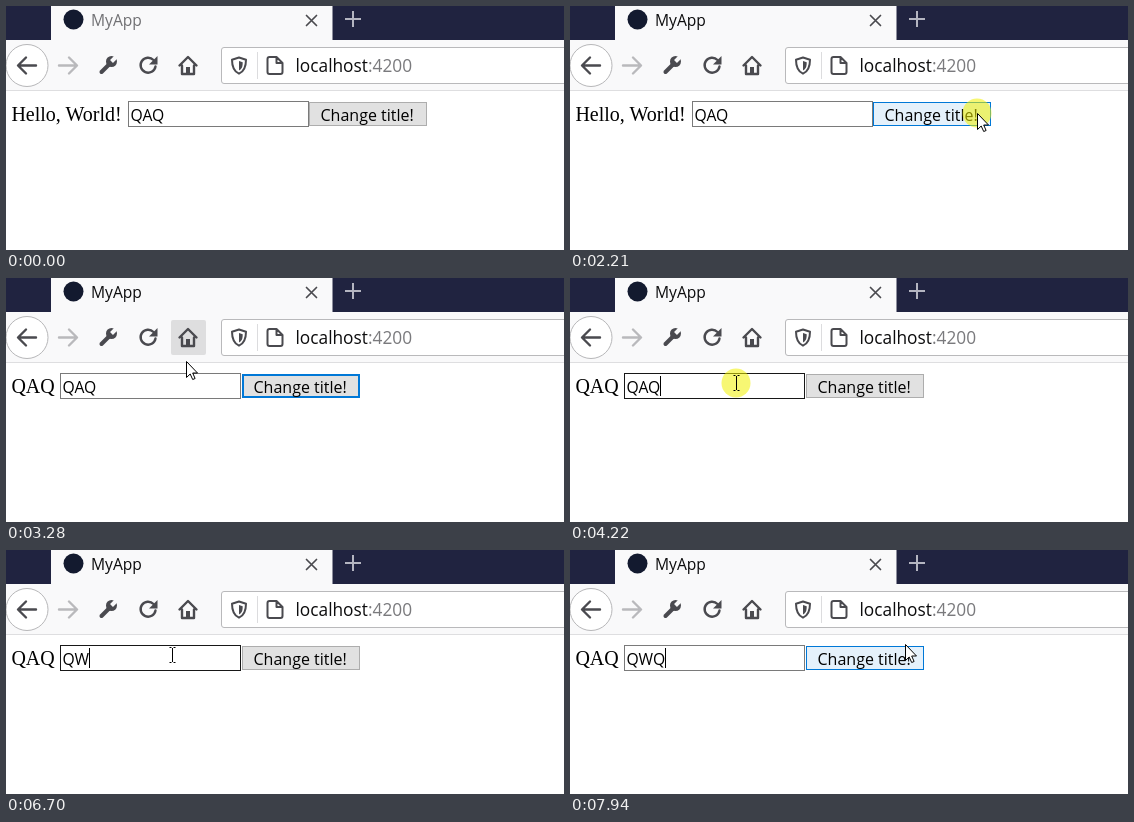
An HTML page for the animation above (8000 ms loop, 558 px wide and 244 px high).

```html
<!DOCTYPE html>
<html lang="en">
<head>
<meta charset="utf-8">
<title>MyApp</title>
<style>
  html, body { margin: 0; width: 100%; height: 100%; overflow: hidden; background: #fff; }
  svg { display: block; width: 558px; height: 244px; }
  text { white-space: pre; }
  .ui { font-family: "Open Sans", "Noto Sans", sans-serif; }
  .page { font: 20px "Liberation Serif", serif; }
  .icon { fill: none; stroke: #4a4a4f; stroke-width: 2.4; stroke-linecap: round; stroke-linejoin: round; }
  .thin { stroke-width: 2; }
  .off { stroke: #b9b9bc; }
</style>
</head>
<body>
<svg viewBox="0 0 558 244">
  <rect width="558" height="34" fill="#202340"/>
  <rect x="45" width="281.5" height="34" fill="#f9f9fa"/>
  <rect y="34" width="558" height="50" fill="#f9f9fa"/>
  <rect y="84" width="558" height="1" fill="#dedee0"/>

  <circle cx="67.5" cy="13.5" r="10" fill="#131a2f"/>
  <text id="tabTitle" class="ui" x="85" y="19.5" font-size="15.6">MyApp</text>
  <path class="icon" style="stroke-width:1.7" d="M300.5 9.5l10 10m0-10l-10 10"/>
  <path d="M339 13h16M347 5v16" stroke="#b4b5c1" stroke-width="2"/>

  <circle cx="21" cy="59.5" r="21" fill="#fff" stroke="#b7b7b9"/>
  <path class="icon" d="M30 59.5H12.5m7.5-8l-8 8 8 8"/>
  <path class="icon off" d="M53 59.5h17.5m-7.5-8l8 8-8 8"/>

  <path class="icon" style="stroke-width:4" d="M95.500 66l7-7"/>
  <circle cx="105.5" cy="55.5" r="5.5" fill="#4a4a4f"/>
  <path d="M105.5 55.5l6-6" stroke="#f9f9fa" stroke-width="4"/>

  <path class="icon" d="M147.5 54a7.5 7.5 0 1 0 2 6.500"/>
  <path d="M151.500 50v8.500h-8.500z" fill="#4a4a4f"/>

  <rect id="homeHover" x="165" y="42" width="35" height="35" rx="2" fill="#dededf"/>
  <path class="icon" d="M173.5 59.5l8.5-8.5 8.5 8.5M176 59.5v8.5h12v-8.5"/>
  <rect x="180" y="61" width="4" height="7" fill="#4a4a4f"/>

  <rect x="215.5" y="41.5" width="360" height="36" rx="2.5" fill="#fff" stroke="#b9b9bb"/>
  <path d="M251.5 46v27" stroke="#dcdcde"/>
  <path class="icon thin" d="M233 51.5l7 2.2c0 7-1.5 11.5-7 14-5.5-2.5-7-7-7-14z"/>
  <path d="M233 55l3.7 1.2c0 4.5-.8 6.5-3.7 8.3z" fill="#4a4a4f"/>
  <path class="icon thin" d="M263.5 51h7l6 6v9q0 2-2 2h-11q-2 0-2-2V53q0-2 2-2zM270.5 51v6h6"/>
  <text class="ui" x="289.5" y="66" font-size="17.3" fill="#0c0c0d">localhost<tspan fill="#7a7a7d">:4200</tspan></text>

  <text id="heading" class="page" x="5.4" y="115"></text>
  <g id="field">
    <rect id="fieldBox" x=".5" y="95.5" width="180" height="25" fill="#fff"/>
    <rect id="selection" x="3" y="98" width="34" height="20" fill="#0078d7"/>
    <text id="fieldText" class="ui" x="2.5" y="114.7" font-size="15.7"></text>
    <rect id="caret" y="98" width="1" height="20"/>
  </g>
  <g id="button">
    <rect id="buttonBox"/>
    <text class="ui" x="11.5" y="114.5" font-size="16">Change title!</text>
  </g>

  <circle id="halo" r="14.5" fill="#f0f000" opacity=".55"/>
  <path id="arrow" d="M.5 .5V16.5L4.2 13 6.7 18.5 9.1 17.5 6.7 12H11.5Z" fill="#fff" stroke="#000"/>
  <path id="beam" d="M-3-7.5H-1M1-7.5H3M0-7V7M-3 7.5H-1M1 7.5H3" fill="none" stroke="#000"/>
</svg>
<script>
const LOOP = 8000;
const FRAME = 75;
const BLINK = 535;
const BUTTON_WIDTH = 118;

const times = {
  press: 2210, hold: 2290, release: 2350,
  focus: 4220, blur: 4370, select: 5380,
  keys: [6310, 6700, 6860]
};

// Eased quadratic curves; the pointer rests at the end of each.
const glides = [
  { start: 570, end: 1320, from: [501, 210], via: [465, 157], to: [428, 105] },
  { start: 1430, end: 1655, from: [421, 102], via: [412, 104], to: [407, 107] },
  { start: 3130, end: 3280, from: [330, 88], via: [140, 60], to: [180, 83] },
  { start: 3280, end: 4030, from: [180, 83], via: [168, 95], to: [166, 105] },
  { start: 7410, end: 7935, from: [316, 119], via: [490, 165], to: [335, 94] }
];

const skins = {
  normal: ['#e1e1e1', '#adadad', 1],
  hover: ['#e5f1fb', '#0078d7', 1],
  pressed: ['#cce4f7', '#005499', 1],
  focus: ['#e1e1e1', '#0078d7', 2]
};

const el = Object.fromEntries([...document.querySelectorAll('[id]')].map(n => [n.id, n]));
const within = (t, from, to) => t >= from && t < to;
const set = (node, attrs) => {
  for (const name in attrs) node.setAttribute(name, attrs[name]);
};
const show = (node, visible) => set(node, { visibility: visible ? 'visible' : 'hidden' });
const move = (node, x, y) => set(node, { transform: `translate(${x} ${y})` });
const hits = (point, left, top, right, bottom) =>
  point && within(point[0], left, right) && within(point[1], top, bottom);

function pointerAt(t) {
  const glide = glides.findLast(g => t >= g.start);
  if (!glide) return null;
  const { start, end, from, via, to } = glide;
  const elapsed = Math.floor((t - start) / FRAME) * FRAME;
  const rest = 1 - Math.min(1, elapsed / (end - start));
  const u = 1 - rest * rest;
  return from.map((a, i) =>
    Math.round((1 - u) ** 2 * a + 2 * u * (1 - u) * via[i] + u * u * to[i]));
}

function buttonSkin(t, hovered) {
  if (within(t, times.hold, times.release)) return skins.pressed;
  if (hovered) return skins.hover;
  return within(t, times.release, times.focus) ? skins.focus : skins.normal;
}

function paintField(t, hovered) {
  const typed = times.keys.filter(key => t >= key);
  const selected = within(t, times.select, times.keys[0]);
  const lastInput = typed.at(-1) ?? times.focus;
  const blinkOn = Math.floor((t - lastInput) / BLINK) % 2 === 0;

  set(el.fieldBox, { stroke: hovered ? '#171717' : '#7a7a7a' });
  el.fieldText.textContent = typed.length ? 'QWQ'.slice(0, typed.length) : 'QAQ';
  set(el.fieldText, { fill: selected ? '#fff' : '#000' });
  show(el.selection, selected);
  set(el.caret, { x: Math.round(2.5 + el.fieldText.getComputedTextLength()) });
  show(el.caret, t >= times.focus && !selected && blinkOn);
}

function paint(t) {
  const changed = t >= times.release;
  const fieldX = changed ? 54 : 122;
  const buttonX = changed ? 236 : 303;
  const pointer = pointerAt(t);
  const inField = hits(pointer, fieldX, 86, fieldX + 181, 122);
  const inButton = hits(pointer, buttonX, 94, buttonX + BUTTON_WIDTH, 122);

  set(el.tabTitle, { fill: t < times.press ? '#707073' : '#0c0c0d' });
  show(el.homeHover, hits(pointer, 165, 42, 200, 85));
  el.heading.textContent = changed ? 'QAQ' : 'Hello, World!';

  move(el.field, fieldX, 0);
  paintField(t, inField);

  const [fill, stroke, line] = buttonSkin(t, inButton);
  move(el.button, buttonX, 0);
  set(el.buttonBox, { fill, stroke, 'stroke-width': line, x: line / 2, y: 96 + line / 2,
    width: BUTTON_WIDTH - line, height: 24 - line });

  show(el.arrow, pointer && !inField);
  show(el.beam, inField);
  show(el.halo, within(t, times.press, times.release) || within(t, times.focus, times.blur));
  if (pointer) {
    const [x, y] = pointer;
    move(el.arrow, x, y);
    move(el.beam, x + 0.5, y);
    move(el.halo, x, y);
  }
}

const start = performance.now();
function tick() {
  paint((performance.now() - start) % LOOP);
  requestAnimationFrame(tick);
}
tick();
</script>
</body>
</html>
```
